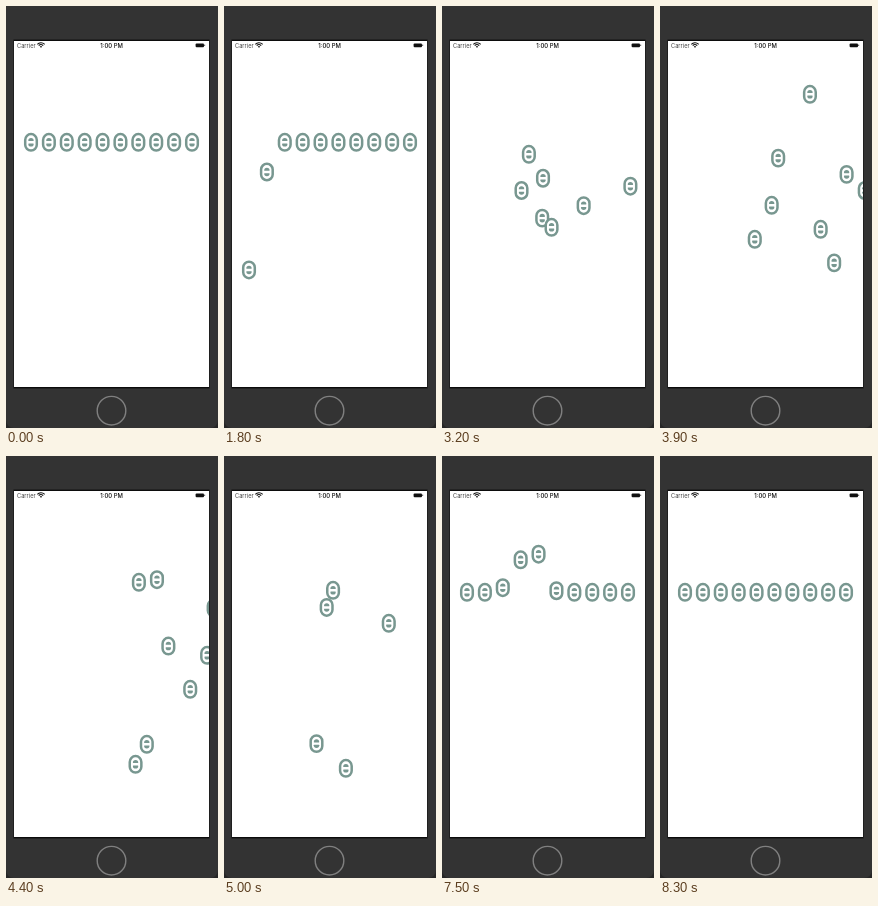
Write an HTML page with a canvas that moves like this. It is 212 by 422 pixels and loops after 9000 ms.

```html
<!DOCTYPE html>
<html lang="en">
<head>
<meta charset="utf-8">
<title>Staggered icons</title>
<style>
  html, body { margin: 0; width: 100%; height: 100%; overflow: hidden; background: #333; }
  canvas { display: block; width: 212px; height: 422px; }
</style>
</head>
<body>
<canvas id="stage"></canvas>
<script>
const W = 212, H = 422, LOOP = 9000, STEP = 100;
const COUNT = 10, HOME_X = 25, HOME_Y = 136.3, GAP = 17.89;
const TEAL = '#789790';
const SCREEN = [8, 35, 195, 346];
const FLIGHT_START = 16, HOP_START = 70;

// The flight is a chain of eased curves, relative to each icon's home.
const LEGS = [
  { to: [0, 174] },
  { via: [-34, 78], to: [33.5, -10] },
  { via: [216, -32], to: [64.5, 45] },
  { via: [40, 37], to: [13, 85] },
  { via: [40, 60], to: [44, 12] },
  { via: [82, 146], to: [35.5, -48] },
  { via: [8, 42], to: [33, 63], steps: 2 },
  { to: [34, 97], steps: 1 },
  { via: [330, 54], to: [33, 172] },
  { via: [130, 120], to: [90, -10] },
  { via: [225, -20], to: [12.5, -2] },
  { via: [2.5, 21], to: [104, 31], steps: 2 },
  { to: [79, 176], steps: 1 },
  { via: [46, 106], to: [5, 10] }
];

const canvas = document.getElementById('stage');
const ctx = canvas.getContext('2d');
const ratio = window.devicePixelRatio || 1;
canvas.width = W * ratio;
canvas.height = H * ratio;
ctx.scale(ratio, ratio);

// Quadratic in-out with a slightly late start.
function ease(u) {
  const v = Math.min(Math.max(u, 0), 1) ** 1.12;
  return v < 0.5 ? 2 * v * v : 1 - 2 * (1 - v) ** 2;
}

function curve(a, c, b, s) {
  return a.map((p, i) => (1 - s) ** 2 * p + 2 * s * (1 - s) * c[i] + s * s * b[i]);
}

function flight(k) {
  let from = [0, 0];
  if (k <= 0) return from;
  for (const { via, to, steps = 3 } of LEGS) {
    if (k <= steps) {
      const mid = via || from.map((p, i) => (p + to[i]) / 2);
      return curve(from, mid, to, ease(k / steps));
    }
    k -= steps;
    from = to;
  }
  return [0, 0];
}

function hop(k) {
  return 40 * (ease((k + 0.25) / 1.45) - ease((k - 1.2) / 2.3));
}

function pill(x, y, w, h, r) {
  ctx.beginPath();
  ctx.roundRect(x, y, w, h, r);
}

function label(text, x, font, align, color) {
  ctx.font = font;
  ctx.textAlign = align;
  ctx.fillStyle = color;
  ctx.fillText(text, x, 41.6);
}

function drawPhone() {
  ctx.fillStyle = '#262626';
  ctx.fillRect(0, 0, W, H);
  ctx.fillStyle = '#333';
  pill(0, -20, W, H + 20, 8);
  ctx.fill();

  ctx.fillStyle = '#0c0c0c';
  ctx.fillRect(7.5, 33.6, 196, 348.8);
  ctx.fillStyle = '#fff';
  ctx.fillRect(...SCREEN);

  ctx.strokeStyle = '#808080';
  ctx.lineWidth = 1.4;
  ctx.beginPath();
  ctx.arc(105.5, 404.7, 14.3, 0, Math.PI * 2);
  ctx.stroke();
}

function drawStatus() {
  label('Carrier', 11, '5.7px Inter, Roboto, sans-serif', 'left', '#444');
  label('1:00 PM', 105.5, '500 5.9px Inter, Roboto, sans-serif', 'center', '#111');

  ctx.strokeStyle = ctx.fillStyle = '#111';
  ctx.lineWidth = 1.1;
  for (const r of [5, 3.1]) {
    ctx.beginPath();
    ctx.arc(35, 41.8, r, -Math.PI * 0.76, -Math.PI * 0.24);
    ctx.stroke();
  }
  ctx.beginPath();
  ctx.moveTo(35, 41.8);
  ctx.arc(35, 41.8, 1.6, -Math.PI * 0.76, -Math.PI * 0.24);
  ctx.fill();

  pill(189.6, 37.4, 8.4, 3.8, 1);
  ctx.fill();
  ctx.fillRect(198.4, 38.6, 0.7, 1.4);
}

function drawIcon(x, y) {
  ctx.save();
  ctx.translate(x, y);
  ctx.strokeStyle = TEAL;
  ctx.lineWidth = 2.5;
  ctx.fillStyle = '#fff';
  pill(-5.8, -8.2, 11.6, 16.4, 5.8);
  ctx.fill();
  ctx.stroke();
  ctx.fillStyle = TEAL;
  pill(-2.7, -4.3, 5.4, 3.1, [2.7, 2.7, 0.4, 0.4]);
  ctx.fill();
  pill(-2.7, 1.2, 5.4, 3.1, [0.4, 0.4, 2.7, 2.7]);
  ctx.fill();
  ctx.restore();
}

function draw(now) {
  const step = Math.floor((now % LOOP) / STEP);
  drawPhone();
  drawStatus();
  ctx.save();
  ctx.beginPath();
  ctx.rect(...SCREEN);
  ctx.clip();
  for (let i = 0; i < COUNT; i++) {
    const [dx, dy] = flight(step - FLIGHT_START - i);
    drawIcon(HOME_X + GAP * i + dx, HOME_Y + dy - hop(step - HOP_START - i));
  }
  ctx.restore();
}

const start = performance.now();
function tick() {
  draw(performance.now() - start);
  requestAnimationFrame(tick);
}
tick();
</script>
</body>
</html>
```
